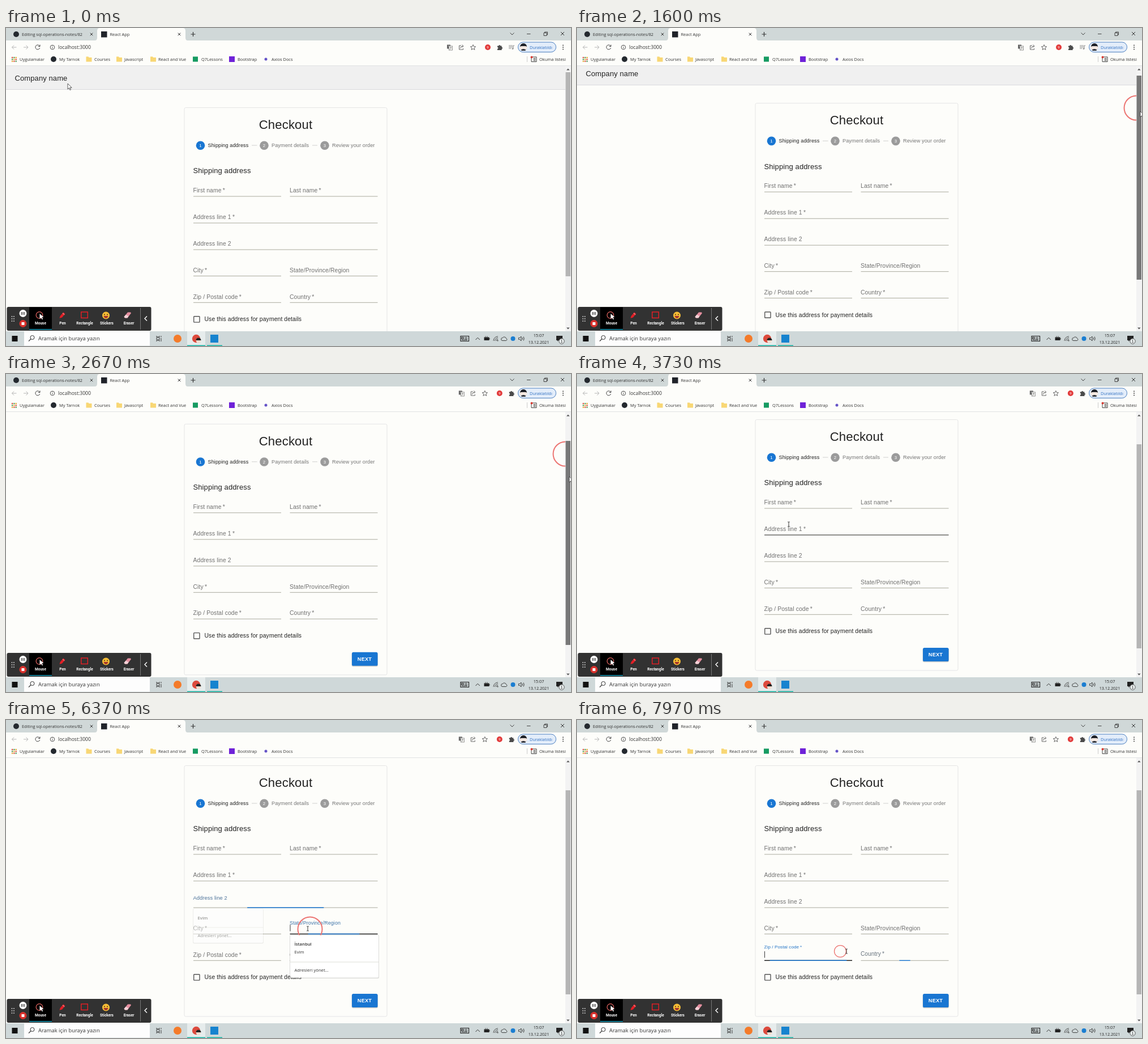
Write an HTML page that moves like this. It is 998 px wide and 561 px high and loops after 8 s.

```html
<!DOCTYPE html>
<html lang="en">
<head>
<meta charset="utf-8">
<title>Checkout form</title>
<style>
  html, body { margin: 0; width: 100%; height: 100%; overflow: hidden; background: #fff; }
  svg { display: block; width: 998px; height: 561px; }
  text { font-family: "Liberation Sans", Arial, sans-serif; white-space: pre; }
  .ui { font-family: "Open Sans", "Noto Sans", sans-serif; }
  .tool { font-family: Roboto, sans-serif; font-weight: 700; }
</style>
</head>
<body>
<svg id="stage" viewBox="0 0 998 561"></svg>
<script>
const LOOP = 8000;
const PAPER = '#fdfdfa', BLUE = [25, 118, 210], GREY = [112, 112, 112];
const stage = document.getElementById('stage');

// Drawing helpers; text is placed by its vertical middle.
const text = (x, y, str, size, fill = '#222', attrs = '') =>
  `<text x="${x}" y="${y + size * 0.35}" font-size="${size}" fill="${fill}" ${attrs}>${str}</text>`;
const ui = (x, y, str, size = 7.45, fill = '#333', attrs = '') =>
  text(x, y, str, size, fill, `class="ui" ${attrs}`);
const rect = (x, y, w, h, fill, attrs = '') =>
  `<rect x="${x}" y="${y}" width="${w}" height="${h}" fill="${fill}" ${attrs}/>`;
const circle = (x, y, r, fill, attrs = '') =>
  `<circle cx="${x}" cy="${y}" r="${r}" fill="${fill}" ${attrs}/>`;
const line = (d, stroke = '#444', width = 1, attrs = '') =>
  `<path d="${d}" fill="none" stroke="${stroke}" stroke-width="${width}" ${attrs}/>`;
const shape = (d, fill, attrs = '') => `<path d="${d}" fill="${fill}" ${attrs}/>`;
const spacing = em => `letter-spacing="${em}em"`;
const middle = 'text-anchor="middle"';

// Page layout is given at scroll position 0.
const fields = [
  ['First name\u2009*', 331, 155, 297],
  ['Last name\u2009*', 501.5, 155, 297],
  ['Address line 1\u2009*', 331, 325.5, 344],
  ['Address line 2', 331, 325.5, 391],
  ['City\u2009*', 331, 155, 437.5],
  ['State/Province/Region', 501.5, 155, 437.5],
  ['Zip / Postal code\u2009*', 331, 155, 484.3],
  ['Country\u2009*', 501.5, 155, 484.3]
].map(([label, x, w, y]) => ({ label, x, w, y }));

const popups = [
  { field: 1, x: 502, y: 298, w: 155, h: 34.5, rows: [['Tavin', 17]] },
  { field: 2, x: 330.5, y: 345.5, w: 124.5, h: 75, rule: 48,
    rows: [['Evim', 16, 600], ['Çamverin', 30.5], ['Adresleri yönet...', 62]] },
  { field: 3, x: 331, y: 393, w: 123, h: 60, rule: 33,
    rows: [['Evim', 16, 600], ['Adresleri yönet...', 47]] },
  { field: 5, x: 502, y: 439.5, w: 156, h: 75, rule: 47.5,
    rows: [['İstanbul', 16, 600], ['Evim', 30], ['Adresleri yönet...', 62]] }
];

// Time, field, pointer position.
const clicks = [
  [4050, 0, 400, 228], [4600, 1, 575, 228], [5060, 2, 433.5, 277], [5650, 3, 450, 321],
  [6300, 5, 537, 369], [7100, 7, 570, 413], [7840, 6, 465, 408]
];
const FOCUS_DELAY = 20;
const drag = { start: 1400, end: 3000, x: 988, y: 141 };
const pointerPath = [
  [0, 109, 98], [250, 109, 98], [1300, 995, 141], [1450, 995, 141], [1600, 995, 147],
  [2670, 995, 181], [2900, 995, 187], [3100, 995, 187], [3730, 374, 265],
  [4050, 400, 228], [4200, 400, 228], [4600, 575, 228], [4750, 575, 228],
  [5060, 433.5, 276.5], [5200, 433.5, 276.5], [5650, 450, 321], [5900, 450, 321],
  [6300, 537, 368], [6370, 533, 368], [6600, 533, 368], [7100, 570, 413],
  [7350, 570, 413], [7840, 465, 408], [7970, 476, 408], [8000, 477, 408]
];

function browserTop() {
  const bookmarks = [
    [24, 'Uygulamalar'], [94, 'My Tarnok'], [156, 'Courses'], [209, 'Javascript'],
    [269, 'React and Vue'], [345, 'Q7Lessons'], [409, 'Bootstrap'], [469, 'Axios Docs']
  ];
  const folder = x => shape(`M${x} 50.5h4l1 1.5h5v7.5h-10z`, '#f8d775');
  const cross = (x, y, r) => line(`M${x - r} ${y - r}l${2 * r} ${2 * r}m0 ${-2 * r}l${-2 * r} ${2 * r}`, '#333');
  const apps = [0, 1, 2].map(r => [0, 1, 2].map(c =>
    rect(10 + c * 3.3, 51 + r * 3.3, 2.2, 2.2, ['#d9483b', '#4a9a58', '#e0a52c'][(r + c) % 3])).join('')).join('');
  return rect(0, 0, 998, 22, '#d0d8d8') + rect(0, 22, 998, 45, PAPER) +
    shape('M157 22q4 0 4-5V5q0-5 5-5h146q5 0 5 5v12q0 5 4 5z', PAPER) +
    circle(18, 11, 5, '#24292f') + ui(28, 11, 'Editing sql-operations-notes/82', 7.35) +
    rect(136, 3, 8, 17, '#d0d8d8', 'opacity=".6"') + cross(151, 11, 2.3) +
    rect(168, 6, 10.5, 10.5, '#20232a') + ui(183.5, 11, 'React App') + cross(306, 11, 2.3) +
    line('M326.5 11h8m-4-4v8', '#333', 1.2) +
    line('M890.5 8.5l3.5 3.5 3.5-3.5M920 10.5h6.5M950 8.5h5v5h-5zM951.5 8.500v-1.500h5v5h-1.500') + cross(983, 10, 3) +
    line('M18.500 34h-8m3.500-3.500l-3.500 3.500 3.500 3.500M31 34h8m-3.500-3.500l3.500 3.500-3.500 3.500', '#b5b5b5') +
    line('M59.500 32a4 4 0 1 0 .3 3M60 29.500v3h-3') +
    circle(82, 34, 3.8, 'none', 'stroke="#555"') + line('M82 33.500v2.500M82 31.500v1', '#555') +
    ui(92, 34, 'localhost:3000', 8.6) +
    `<g id="extensions">` +
      rect(779, 29.5, 6, 7, '#666') + rect(782.5, 32, 6, 7, PAPER, 'stroke="#777" stroke-width=".8"') +
      text(783, 33, 'G', 4, '#fff', middle) + line('M784 34.500h3m-1.500-1v1m-1.500 3q2.500-1 2.500-3', '#666', 0.7) +
      line('M804 31h-3.500v7h7v-2M802.500 36q.5-4 4.500-4m-1.500-2.500l2.500 2.500-2.500 2', '#555', 0.9) +
      shape('M825 29.500l1.300 3.100 3.400.3-2.600 2.200.8 3.300-2.900-1.800-2.900 1.800.8-3.300-2.600-2.200 3.400-.3z', 'none', 'stroke="#555" stroke-width=".9"') +
      circle(851, 34, 5, '#e23b3b') + text(851, 34, '9', 6, '#fff', middle) +
      shape('M868 31.500h2.300a1.500 1.500 0 1 1 3 0h2.300v2.300a1.500 1.500 0 1 1 0 3v2.200h-7.600v-2.300a1.400 1.400 0 1 0 0-2.800z', '#4a4a4a') +
    `</g><g id="media">` + line('M888 31h7M888 33.500h7M888 36h4.500M896 36.500v-5.500h2', '#888') +
      circle(895, 36.5, 1.3, '#888') + `</g>` +
    rect(904.5, 25, 67, 17.5, '#e3edfa', 'rx="8.700" stroke="#4b7fc0" stroke-width="1"') +
    circle(914, 34, 6.5, '#f3e7e0') + shape('M908 33a6 6 0 0 1 12 0l-2-1h-8z', '#1d2027') +
    shape('M909.500 38.500q4.500-3 9 0l-1.500 1.500h-6z', '#252b35') +
    ui(925, 34, 'Duraklatıldı', 7.45, '#2f6fc1') + [30.5, 34, 37.5].map(y => circle(984, y, 0.9, '#333')).join('') +
    apps + bookmarks.map(([x, s]) => ui(x, 55, s)).join('') + circle(84, 55, 5, '#24292f') +
    [141.5, 195, 255].map(folder).join('') + rect(330, 50.5, 9, 9, '#169b62') +
    rect(394, 50, 10, 10, '#6f22d8') + circle(459, 55, 2.5, '#6654c8') +
    line('M920.500 50v10', '#ccc') + line('M928 51h9v8.500h-9zM931.500 53.500h4M931.500 55.500h4M931.500 57.500h4') +
    circle(928.5, 51.5, 2, '#d83a32') + ui(942, 55, 'Okuma listesi') + line('M0 66.500h998', '#dadcde', 0.8);
}

function formPage() {
  const steps = [[343.5, 'Shipping address'], [456, 'Payment details'], [563, 'Review your order']];
  const stepper = steps.map(([x, label], i) =>
    circle(x, 207.2, 7.8, i ? '#9b9b9b' : '#1976d2') + text(x, 207.2, i + 1, 7.8, '#fff', middle) +
    text(x + 13, 207, label, 9.1, i ? '#757575' : '#222', spacing(0.0107))).join('');
  const inputs = fields.map(f => `<g class="field">` +
    line(`M${f.x} ${f.y}h${f.w}`, '#aaaa9e', 1, 'class="base"') +
    line(`M${f.x} ${f.y}h${f.w}`, '#1976d2', 1.4, 'class="active"') +
    `<text class="label" font-size="10.4" ${spacing(0.0094)}>${f.label}</text>` +
    line(`M${f.x + 0.5} ${f.y - 16.3}v11.500`, '#222', 0.9, 'class="caret"') + `</g>`).join('');
  return rect(0, 60, 988, 48.5, '#f0f0f0') + line('M0 108.500h988', '#d9d9dc') +
    text(15.5, 88, 'Company name', 13, '#222', spacing(0.0075)) +
    rect(315, 140.5, 358, 442.5, PAPER, 'rx="2.600" stroke="#e2e2e4" stroke-width=".9"') +
    text(494, 170, 'Checkout', 22.1, '#222', middle + ' ' + spacing(0.00735)) + stepper +
    line('M434 207h9.500M541 207h9', '#c4c4c4', 0.8) +
    text(330.5, 251.8, 'Shipping address', 13, '#222', spacing(0.0075)) + inputs +
    rect(331.7, 508.8, 10.3, 10.3, 'none', 'rx=".8" stroke="#555" stroke-width="1.400"') +
    text(350.5, 513.8, 'Use this address for payment details', 10.4, '#222', spacing(0.0094)) +
    rect(610.5, 544, 46.5, 24.5, '#000', 'rx="3" opacity=".18"') +
    rect(611, 543, 45.5, 24, '#1976d2', 'rx="2.600"') +
    text(633.5, 555, 'NEXT', 9.1, '#fff', middle + ' font-weight="700" ' + spacing(0.0286));
}

const popupMarkup = p => `<g class="popup">` +
  rect(p.x - 1, p.y - 0.5, p.w + 2, p.h + 2, '#000', 'rx="2.500" opacity=".13"') +
  rect(p.x, p.y, p.w, p.h, '#fff', 'rx="2"') +
  (p.rule ? line(`M${p.x} ${p.y + p.rule}h${p.w}`, '#dedfd8') : '') +
  p.rows.map(([s, y, weight = 400]) => ui(p.x + 7.5, p.y + y, s, 7.7, '#333', `font-weight="${weight}"`)).join('') + `</g>`;

function recorder() {
  const labels = [[61, 'Mouse'], [100, 'Pen'], [139, 'Rectangle'], [178, 'Stickers'], [217, 'Eraser']];
  const dots = [509, 513, 517].map(y => circle(10.5, y, 0.9, '#ddd') + circle(14, y, 0.9, '#ddd')).join('');
  return rect(1.5, 492, 255, 42, '#323232', 'rx="3"') +
    rect(41, 492.5, 40, 40, '#000') + rect(41, 531, 40, 1.5, '#1598b5') + dots +
    circle(30, 503.5, 6.5, '#fff') + line('M28.300 501v5M31.700 501v5', '#222', 1.4) +
    circle(30, 521.5, 6.5, '#d9302b') + rect(27.5, 519, 5, 5, '#fff') +
    circle(59, 506.5, 5.8, 'none', 'stroke="#d9605c" stroke-width="1.300"') +
    shape('M59.500 504l7 6-3.200.3 2 3.200-1.500.8-1.800-3.300-2.500 2z', '#fff') +
    shape('M94.500 512l1.200-4 5.500-6.500 3.300 2.800-5.600 6.400z', '#e11f26') + line('M100 503l3.300 2.800', '#fff', 0.7) +
    rect(132.8, 501, 11.5, 10.5, 'none', 'stroke="#e11f26" stroke-width="1.500"') +
    circle(176.5, 507, 6.5, '#f6bd36') + circle(174, 505.5, 1, '#4b2b10') + circle(179, 505.5, 1, '#4b2b10') +
    shape('M172.500 508h8q-1 4-4 4t-4-4z', '#a4322c') +
    shape('M208.500 509.500l6.500-8h5l1 1.500-6.500 8.500h-4.500z', '#e58fa0') + shape('M208.500 509.500l3-3.700 5 2.500-2 3.200h-4.500z', '#f4d3d8') +
    labels.map(([x, s]) => text(x, 520.7, s, 6.5, '#fff', `class="tool" ${middle}`)).join('') +
    line('M237.500 494v38', '#888', 0.8) + line('M249 508.500l-4 4 4 4', '#fff', 1.4);
}

function taskbar() {
  return rect(0, 535, 998, 26, '#cfd8d9') + rect(10.5, 543, 10, 10, '#111') +
    rect(32, 535.5, 222, 25, '#fdfdfd') + circle(46.5, 546, 3.5, 'none', 'stroke="#333"') + line('M44 548.500l-4 4', '#333', 1.1) +
    ui(57, 548, 'Aramak için buraya yazın', 9.4) +
    line('M266 543v2h5v-2M266 553v-2h5v2M266 546h5v4h-5zM274 543v2.500M274 547v6', '#333', 0.9) +
    circle(303, 548, 7, '#f47b2a') + rect(320, 535, 32, 26, '#e6ecec') +
    circle(336, 548, 7.2, '#dc4a3d') + circle(340, 551.5, 4.3, '#f0ddcf') + shape('M335.500 551a4.500 4.500 0 0 1 9 0z', '#222') +
    rect(361, 541, 14, 14, '#1683cf') + rect(320, 559.5, 32, 1.5, '#16b6a5') + rect(355, 559.5, 27, 1.5, '#16b6a5') +
    line('M803 543.500h14.500v9h-14.500zM805 545.500h3v3h-3zM810 546h5M810 548.500h5M805 550.500h10', '#222', 1.2) +
    line('M829.500 550l3.700-3.700 3.700 3.700', '#333') + rect(844.5, 545.5, 9, 5.5, '#222') + rect(853.5, 547, 1, 2.5, '#222') +
    line('M847 545.500v-2M850 545.500v-2') +
    line('M861 552a8 8 0 0 1 8-8M863.500 552a5.500 5.500 0 0 1 5.500-5.500M866 552a3 3 0 0 1 3-3', '#444', 0.9) + circle(868.5, 551.5, 1, '#333') +
    shape('M877 551.500a2.500 2.500 0 0 1 .2-5 3.500 3.500 0 0 1 6.200 1 2.100 2.100 0 0 1 0 4z', 'none', 'stroke="#333" stroke-width=".9"') +
    circle(895.5, 548, 4, '#1b7ed1') +
    line('M905.500 546.500h2l2.500-2.500v8l-2.500-2.500h-2zM912 546q1.500 2 0 4M914 544.500q2.500 3.500 0 7', '#333', 0.9) +
    ui(941, 542, '15:07', 7.3, '#222', middle) + ui(941, 554, '13.12.2021', 7.2, '#222', middle) +
    shape('M972 543h11v8h-7l-2 2v-2h-2z', '#222') + circle(981.5, 552.5, 4.7, '#e8eded', 'stroke="#333" stroke-width=".8"') +
    text(981.5, 552.5, '1', 6.5, '#222', middle);
}

stage.innerHTML = `<defs><clipPath id="view"><rect y="67" width="988" height="468"/></clipPath></defs>` +
  rect(0, 0, 998, 561, PAPER) +
  `<g clip-path="url(#view)"><g id="page">${formPage()}</g>` +
  `<circle id="ring" fill="none" stroke="#ec7471"/><g id="popups">${popups.map(popupMarkup).join('')}</g></g>` +
  rect(988, 67, 10, 468, '#f3f3f3') + shape('M990 74.500l2.800-3 2.800 3zM990 528.500h5.600l-2.800 3z', '#555') +
  `<rect id="thumb" x="988.500" width="8.500" height="360"/>` +
  browserTop() + recorder() + taskbar() +
  `<path id="arrow" d="M0 0v10l2.300-2.200 1.700 3.700 1.600-.7-1.700-3.500h3.300z" fill="#fff" stroke="#333" stroke-width=".8"/>` +
  `<path id="beam" d="M-1.800-4h1.500l.3.400.3-.4h1.500M0-3.600v7.200M-1.800 4h1.500l.3-.4.3.4h1.500" fill="none" stroke="#222" stroke-width=".9"/>`;

const el = id => document.getElementById(id);
const clamp = (v, lo = 0, hi = 1) => Math.min(hi, Math.max(lo, v));
const show = (node, on) => node.setAttribute('visibility', on ? 'visible' : 'hidden');
const fieldNodes = [...stage.querySelectorAll('.field')].map(g => ({
  base: g.querySelector('.base'), active: g.querySelector('.active'),
  label: g.querySelector('.label'), caret: g.querySelector('.caret')
}));
const popupNodes = [...stage.querySelectorAll('.popup')];

// cubic-bezier(0, 0, .2, 1)
function easeOut(u) {
  u = clamp(u);
  if (u === 0 || u === 1) return u;
  let lo = 0, hi = 1;
  for (let i = 0; i < 18; i++) {
    const s = (lo + hi) / 2;
    if (0.6 * s * s + 0.4 * s ** 3 < u) lo = s; else hi = s;
  }
  return 3 * lo * lo - 2 * lo ** 3;
}

function pointerAt(t) {
  const i = Math.max(1, pointerPath.findIndex(p => p[0] > t));
  const [t0, x0, y0] = pointerPath[i - 1], [t1, x1, y1] = pointerPath[i];
  const u = clamp((t - t0) / (t1 - t0)), s = u * u * (3 - 2 * u);
  return [x0 + (x1 - x0) * s, y0 + (y1 - y0) * s];
}

// Caret and popup react at once; label and underline follow after a short delay.
function focusOf(index, t) {
  const i = clicks.findIndex(c => c[1] === index);
  if (i < 0 || t < clicks[i][0]) return { amount: 0, popup: 0, since: -1 };
  const start = clicks[i][0], end = i + 1 < clicks.length ? clicks[i + 1][0] : Infinity;
  const progress = from => easeOut((t - from - FOCUS_DELAY) / 200);
  return t < end
    ? { amount: progress(start), popup: 1, since: t - start }
    : { amount: 1 - progress(end), popup: clamp(1 - (t - end - FOCUS_DELAY) / 100), since: -1 };
}

function drawField(f, node, index, t, x, y) {
  const { amount, since } = focusOf(index, t);
  const hover = x >= f.x && x <= f.x + f.w && y >= f.y - 21 && y <= f.y + 1;
  const focused = since >= 0;
  const mid = f.x + f.w / 2;
  node.base.setAttribute('stroke', hover ? (focused ? '#222' : '#6a6a66') : '#aaaa9e');
  node.base.setAttribute('stroke-width', hover ? 1.4 : 1);
  node.active.setAttribute('transform', `translate(${mid} 0) scale(${amount} 1) translate(${-mid} 0)`);
  const scale = 1 - 0.25 * amount;
  node.label.setAttribute('transform', `translate(${f.x - 0.5} ${f.y - 6.7 - 16.8 * amount}) scale(${scale})`);
  node.label.setAttribute('fill', `rgb(${GREY.map((g, i) => Math.round(g + (BLUE[i] - g) * amount))})`);
  show(node.caret, focused && since % 1000 < 500);
  return hover;
}

function drawRing(t) {
  const held = t >= drag.start && t < drag.end + 80;
  const click = clicks.find(c => t >= c[0] && t < c[0] + 170);
  const ring = el('ring');
  show(ring, held || click);
  if (!held && !click) return;
  const shrink = held ? clamp((t - drag.end) / 80) : clamp((t - click[0] - 90) / 80);
  ring.setAttribute('cx', held ? drag.x : click[2]);
  ring.setAttribute('cy', held ? drag.y : click[3]);
  ring.setAttribute('r', 21.5 * (1 - shrink));
  ring.setAttribute('stroke-width', 2 - 1.4 * shrink);
}

function render(t) {
  const [x, y] = pointerAt(t);
  const dragged = t < drag.start ? 0 : t > 2900 ? 46 : clamp(y - drag.y, 0, 46);
  const scroll = dragged * 60 / 46;
  const shift = `translate(0 ${-scroll})`;
  el('page').setAttribute('transform', shift);
  el('popups').setAttribute('transform', shift);
  el('thumb').setAttribute('y', 78 + dragged);
  el('thumb').setAttribute('fill', t >= drag.start && t < drag.end ? '#787878' : '#b5b5b5');

  const hovers = fields.map((f, i) => drawField(f, fieldNodes[i], i, t, x, y + scroll));
  popups.forEach((p, i) => popupNodes[i].setAttribute('opacity', focusOf(p.field, t).popup));
  drawRing(t);

  const overField = hovers.includes(true);
  show(el('arrow'), !overField);
  show(el('beam'), overField);
  for (const id of ['arrow', 'beam']) el(id).setAttribute('transform', `translate(${x} ${y})`);

  const mediaGone = t > 2100;
  show(el('media'), !mediaGone);
  el('extensions').setAttribute('transform', `translate(${mediaGone ? 20.8 : 0} 0)`);
}

const began = performance.now();
function tick() {
  render((performance.now() - began) % LOOP);
  requestAnimationFrame(tick);
}
tick();
</script>
</body>
</html>
```
